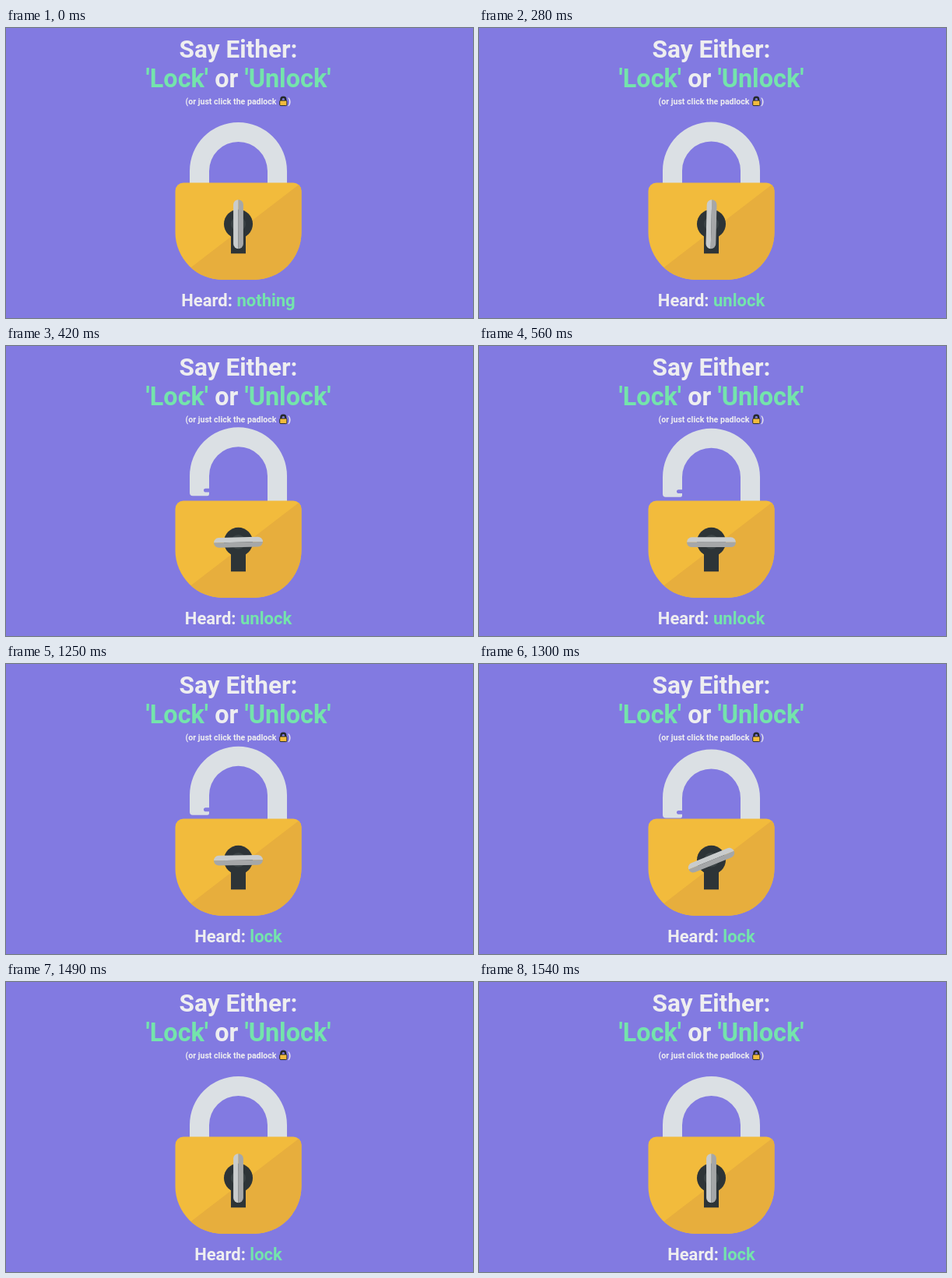
These frames come from a looping animation (600 px wide and 372 px high, 2.28 s). An HTML page:

```html
<!DOCTYPE html>
<html lang="en">
<head>
<meta charset="utf-8">
<title>Voice padlock</title>
<style>
  html, body { margin: 0; width: 100%; height: 100%; overflow: hidden; background: #827ae1; }
  svg { display: block; width: 600px; height: 372px; }
  text { font-family: Roboto, sans-serif; font-weight: 700; fill: #eeeef0; text-anchor: middle; }
  .accent { fill: #74e4ac; }
  .hint { font-size: 10.6px; text-anchor: start; }
  .heard { font-size: 22px; }
</style>
</head>
<body>
<svg viewBox="0 0 600 372">
  <defs>
    <clipPath id="bodyShape">
      <path d="M228 198.5H369A10.5 10.5 0 0 1 379.5 209V262A61 61 0 0 1 318.5 323H278.5A61 61 0 0 1 217.5 262V209A10.5 10.5 0 0 1 228 198.5Z"/>
    </clipPath>
    <clipPath id="keyShape">
      <rect x="-6.4" y="-31.5" width="12.8" height="63" rx="6.4"/>
    </clipPath>
  </defs>

  <text x="298.5" y="37.5" font-size="31.6">Say Either:</text>
  <text x="298.5" y="76.3" font-size="32.4"><tspan class="accent">'Lock'</tspan> or <tspan class="accent">'Unlock'</tspan></text>

  <text class="hint" x="230.5" y="97.5">(or just click the padlock</text>
  <text class="hint" x="362.3" y="97.5">)</text>
  <g stroke="#25292c">
    <path d="M353.4 94V91.6a2.9 2.9 0 0 1 5.8 0V94" fill="none" stroke-width="2.4"/>
    <rect x="351.7" y="93" width="9.2" height="6.6" rx="1.2" fill="#f2bb3c"/>
  </g>

  <g id="shackle">
    <path d="M236 183.5a62.5 62.5 0 0 1 125 0V230H336V183.5a37.5 37.5 0 0 0 -75 0V199.5H256.3a2.3 2.3 0 0 0 0 4.8H261V206.5a2.5 2.5 0 0 1 -2.5 2.5H240a4 4 0 0 1 -4 -4Z" fill="#dbe0e4"/>
  </g>

  <g clip-path="url(#bodyShape)">
    <rect x="217" y="198" width="163" height="126" fill="#f2bb3c"/>
    <path d="M380 198L230 313V330H380Z" fill="#e7ae3d"/>
  </g>
  <g fill="#2d3437">
    <circle cx="298.5" cy="251.3" r="18.5"/>
    <rect x="289" y="252" width="19" height="37.3"/>
    <circle cx="298.5" cy="251.3" r="9.3" fill="#3c4446"/>
  </g>
  <g id="key">
    <g clip-path="url(#keyShape)">
      <rect x="-7" y="-32" width="7" height="64" fill="#c9cccd"/>
      <rect x="0" y="-32" width="7" height="64" fill="#a5a7a8"/>
    </g>
  </g>

  <text class="heard" x="298.5" y="356.5">Heard: <tspan class="accent" id="word">nothing</tspan></text>
</svg>
<script>
  const LOOP = 2280, UNLOCK = 280, LOCK = 1250, LIFT = 15.3;
  // The picture updates on these ticks and holds in between.
  const TICKS = [0, 280, 320, 370, 420, 470, 510, 560, 1250, 1300, 1350, 1400, 1440, 1490, 1540];
  const [shackle, key, word] = ['shackle', 'key', 'word'].map(id => document.getElementById(id));

  const progress = (t, start, duration) => Math.min(1, Math.max(0, (t - start) / duration));
  const inOut = u => u < 0.5 ? 2 * u * u : 1 - 2 * (1 - u) ** 2;
  const backOut = u => 1 + 2.7 * (u - 1) ** 3 + 1.7 * (u - 1) ** 2;

  function draw(t) {
    const closing = inOut(progress(t, 1237, 180));
    const turn = inOut(progress(t, 265, 170)) - closing;
    const lift = backOut(progress(t, 278, 260)) - closing;
    key.setAttribute('transform', `translate(298.5 251.7) rotate(${90 * turn})`);
    shackle.setAttribute('transform', `translate(0 ${-LIFT * lift})`);
    const heard = t < UNLOCK ? 'nothing' : t < LOCK ? 'unlock' : 'lock';
    if (word.textContent !== heard) word.textContent = heard;
  }

  const begin = performance.now();
  function frame() {
    const now = (performance.now() - begin) % LOOP;
    draw(TICKS.findLast(tick => tick <= now) ?? 0);
    requestAnimationFrame(frame);
  }
  frame();
</script>
</body>
</html>
```
